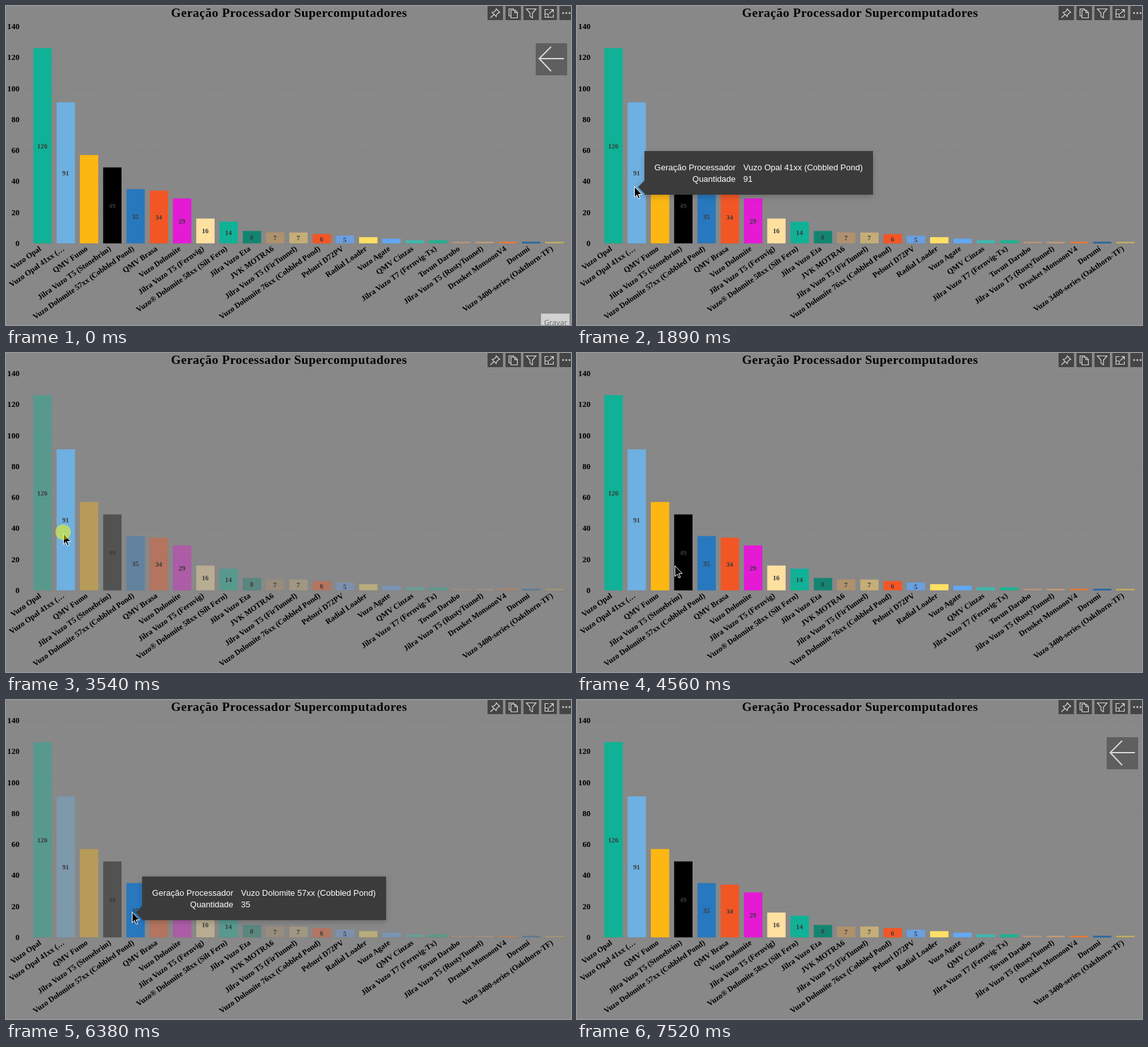
Animation of 880x497 px, one loop 9.14 s. Source, as an HTML page:

```html
<!DOCTYPE html>
<html lang="pt">
<head>
<meta charset="utf-8">
<title>Geração Processador Supercomputadores</title>
<style>
html, body { margin: 0; width: 100%; height: 100%; overflow: hidden; background: #888; }
svg { display: block; width: 880px; height: 497px; }
.serif { font-family: "Liberation Serif", "Times New Roman", serif; font-weight: bold; }
.tip { font: 13px "Liberation Sans", Arial, sans-serif; fill: #fff; }
</style>
</head>
<body>
<svg id="stage" viewBox="0 0 880 497">
  <defs>
    <filter id="shade" x="-10%" y="-30%" width="120%" height="170%">
      <feDropShadow dx="0" dy="3" stdDeviation="5" flood-color="#000" flood-opacity=".2"/>
    </filter>
  </defs>
  <rect width="880" height="497" fill="#888"/>
  <text class="serif" x="257" y="17" font-size="19.6" letter-spacing=".48">Geração Processador Supercomputadores</text>
  <g id="grid"></g>
  <g id="bars"></g>
  <g id="names"></g>
  <g id="tools">
    <g id="toolBoxes" fill="#454545"></g>
    <g fill="none" stroke="#d6d6d6" stroke-width="1.2">
      <path d="M763.5 4.5L769 10L767 10.5L764 13.5L763.5 16.5L757 10L760 9.5L763 6.5ZM760 13.2L754.5 18.5"/>
      <path d="M787 15.5H783.5V4.5H790.5V6.5M786.5 6.5H793L796.5 10V18.5H786.5ZM792.5 6.5V10.5H796.5"/>
      <path d="M810.5 4.5H825.5L820 11V18.5L816 16V11Z"/>
      <path d="M845 5.5H839.5V17.5H852.5V13M847.5 5.5H852.5V10.5M852.5 5.5L846 12M839.5 12.5H844.5V17.5"/>
    </g>
    <path d="M866.5 11h2.4M871.5 11h2.4M876.5 11h2.4" stroke="#d6d6d6" stroke-width="2.4"/>
  </g>
  <g id="back">
    <rect x="825" y="58" width="49" height="50" fill="#5f5f5f"/>
    <path d="M869 82H831M849 63.5L830.5 82L849 101.5" fill="none" stroke="#d8d8d8" stroke-width="2"/>
  </g>
  <g id="record">
    <rect x="833.5" y="479.5" width="44" height="20" fill="#d2d2d2" stroke="#bdbdbd"/>
    <text x="838" y="497" font-family="Open Sans, sans-serif" font-size="11.5" fill="#666">Gravar</text>
  </g>
  <g id="tips"></g>
  <path id="cursor" d="M0 0V16.5L3.7 13L6.2 18.8L8.6 17.8L6.1 12.1H11.5Z" fill="#000" stroke="#fff"/>
  <circle id="click" r="12" fill="#ff0" opacity=".5"/>
</svg>
<script>
const LOOP = 9140, BASE = 369.8, UNIT = 338 / 140;
const $ = id => document.getElementById(id);

function add(parent, tag, attrs, text) {
  const el = document.createElementNS("http://www.w3.org/2000/svg", tag);
  for (const key in attrs) el.setAttribute(key, attrs[key]);
  if (text !== undefined) el.textContent = text;
  parent.appendChild(el);
  return el;
}

const data = [
  ["Vuzo Opal", 126, "#10b196"],
  ["Vuzo Opal 41xx (…", 91, "#6eb0e1"],
  ["QMV Fumo", 57, "#fdb713"],
  ["Jilra Vuzo T5 (Stonebrim)", 49, "#000"],
  ["Vuzo Dolomite 57xx (Cobbled Pond)", 35, "#2878bd"],
  ["QMV Brasa", 34, "#f35625"],
  ["Vuzo Dolomite", 29, "#e41ad5"],
  ["Jilra Vuzo T5 (Fernvig)", 16, "#fee0a0"],
  ["Vuzo® Dolomite 58xx (Silt Fern)", 14, "#10b196"],
  ["Jilra Vuzo Eta", 8, "#128571"],
  ["JVK MOTRA6", 7, "#b0916d"],
  ["Jilra Vuzo T5 (FirTunnel)", 7, "#c5ad78"],
  ["Vuzo Dolomite 76xx (Cobbled Pond)", 6, "#f35625"],
  ["Pelsuri D72PV", 5, "#6a9fe0"],
  ["Radial Loader", 4, "#fee066"],
  ["Vuzo Agate", 3, "#62a8f5"],
  ["QMV Cinzas", 2, "#3fb8ad"],
  ["Jilra Vuzo T7 (Fernvig-Tx)", 2, "#20b090"],
  ["Tovun Darubo", 1, "#b8957a"],
  ["Jilra Vuzo T5 (RustyTunnel)", 1, "#c09d78"],
  ["Drusket MonsoonV4", 1, "#ee7a35"],
  ["Dorumi", 1, "#2166a0"],
  ["Vuzo 3400-series (Oakthorn-TF)", 1, "#c5ad60"]
];

for (let v = 0; v <= 140; v += 20) {
  const y = BASE - v * UNIT;
  add($("grid"), "path", { d: `M27 ${Math.round(y) + .5}H880`, stroke: "#777", "stroke-dasharray": "1 3" });
  add($("grid"), "text", { class: "serif", x: 21, y: y + 4.2, "font-size": 12.6, "text-anchor": "end" }, v);
}

const bars = data.map(([name, value, fill], i) => {
  const x = 42.6 + i * 36.24, h = value * UNIT, mid = x + 13.9;
  const bar = add($("bars"), "rect", { x, y: BASE - h, width: 28.6, height: h, fill });
  if (value >= 5 && value !== 57)
    add($("bars"), "text", { class: "serif", x: mid, y: BASE - h / 2 + 4, "font-size": 10.6, "text-anchor": "middle", fill: "#3a3a3a" }, value);
  add($("names"), "text", { class: "serif", "font-size": 12.2, "text-anchor": "end", transform: `translate(${mid - 1} 380) rotate(-35)` }, name);
  return bar;
});

for (let i = 0; i < 5; i++)
  add($("toolBoxes"), "rect", { x: 750 + i * 28, y: -2, width: 24, height: 24 });

function makeTip(x, y, w, name, value) {
  const g = add($("tips"), "g", { transform: `translate(${x} ${y})` });
  add(g, "path", { d: `M0 0H${w}V68H0V66L-10 56L0 46Z`, fill: "#3a3a3a", filter: "url(#shade)" });
  [["Geração Processador", name], ["Quantidade", value]].forEach(([label, val], row) => {
    const ty = 30 + row * 18;
    add(g, "text", { class: "tip", x: 142, y: ty, "text-anchor": "end" }, label);
    add(g, "text", { class: "tip", x: 154, y: ty }, val);
  });
  return g;
}
const tipA = makeTip(105, 226, 356, "Vuzo Opal 41xx (Cobbled Pond)", 91);
const tipB = makeTip(212, 275, 380, "Vuzo Dolomite 57xx (Cobbled Pond)", 35);

// start, end, steps, from, to
const moves = [
  [70, 740, 11, [858, 478], [130, 291]],
  [940, 1420, 8, [130, 291], [89, 281]],
  [4160, 4560, 6, [89, 281], [152, 331]],
  [4630, 5040, 7, [152, 331], [190, 330]],
  [5110, 5250, 3, [190, 330], [196, 330]],
  [7390, 7460, 2, [196, 330], [520, 345]]
];

function cursorAt(t) {
  let pos = moves[0][3];
  for (const [start, end, steps, from, to] of moves) {
    if (t < start) break;
    const k = Math.min(steps, 1 + Math.floor((t - start) / ((end - start) / (steps - 1)) + .01));
    const p = k / steps, e = p * (2 - p);
    pos = from.map((a, i) => a + (to[i] - a) * e);
  }
  return pos;
}

// value of the last [time, value] pair reached
const hold = (t, pairs) => pairs.reduce((v, [at, next]) => t >= at ? next : v, 0);
const within = (t, a, b) => t >= a && t < b;
const show = (el, on) => el.setAttribute("visibility", on ? "visible" : "hidden");

function draw(t) {
  const dim = 1 - hold(t, [[2100, .35], [2170, .6], [3690, 0], [6310, .35], [6380, .6], [7050, 0]]);
  const chosen = t < 4000 ? 1 : 4;
  bars.forEach((bar, i) => bar.setAttribute("opacity", i === chosen ? 1 : dim));

  tipA.setAttribute("opacity", hold(t, [[1890, 1], [2500, .93], [2570, .72], [2640, .35], [2710, 0]]));
  tipB.setAttribute("opacity", hold(t, [[5650, 1], [6640, .93], [6710, .72], [6780, .35], [6850, 0]]));

  const [x, y] = cursorAt(t);
  $("cursor").setAttribute("transform", `translate(${x + .5} ${y + .5})`);
  show($("cursor"), within(t, 70, 7520));
  $("click").setAttribute("cx", x);
  $("click").setAttribute("cy", y - 2);
  show($("click"), within(t, 1960, 2170) || within(t, 3540, 3690) || within(t, 6180, 6380) || within(t, 6910, 7050));

  show($("back"), t < 140 || t >= 7520);
  show($("record"), t < 140);
}

function tick() {
  draw(performance.now() % LOOP);
  requestAnimationFrame(tick);
}
tick();
</script>
</body>
</html>
```
